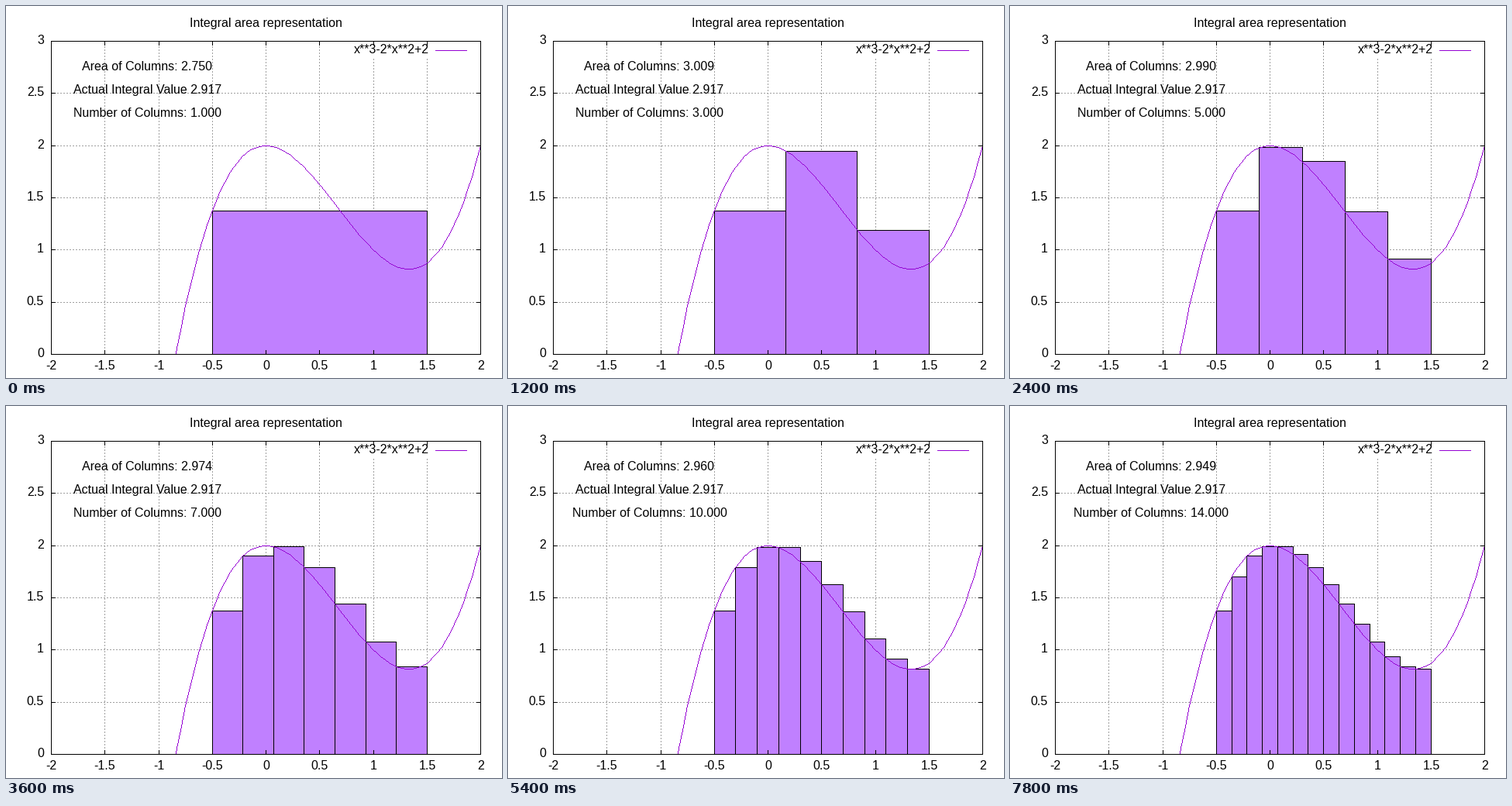
A matplotlib script for the animation above (8 s loop, 640x480 px).

```python
import numpy as np
import matplotlib.pyplot as plt
from matplotlib.animation import FuncAnimation
from matplotlib.collections import PolyCollection

W, H, DPI = 640, 480, 80
PX = 72 / DPI                      # one pixel in points
LEFT, RIGHT, TOP, BOTTOM = 58, 612, 45, 449
KEY_LEFT, KEY_RIGHT, KEY_BOTTOM = 447, 604, 66
TICK = 5
PURPLE, GREY = "#9400d3", "#a0a0a0"
A, B = -0.5, 1.5                   # integration limits
INTERVAL, HOLD, FRAMES = 200, 3, 40

plt.rcParams["font.family"] = "Liberation Sans"
plt.rcParams["font.size"] = 16 * PX


def f(x):
    return x**3 - 2 * x**2 + 2


def nearest(v):
    return np.floor(v + 0.5).astype(int)


def col(x):
    return nearest(LEFT + (x + 2) * (RIGHT - LEFT) / 4)


def row(y):
    return nearest(BOTTOM - y * (BOTTOM - TOP) / 3)


fig = plt.figure(figsize=(W / DPI, H / DPI), dpi=DPI, facecolor="white")
ax = fig.add_axes([0, 0, 1, 1])
ax.set_xlim(0, W)
ax.set_ylim(H, 0)
ax.axis("off")


def line(xs, ys, color="black", **kw):
    """Draw a straight one-pixel line; snapping centres it on the pixels."""
    ax.plot(xs, ys, color=color, lw=PX, antialiased=False, snap=True,
            zorder=5, **kw)


def dots(xs, ys, color, z):
    """Fill single pixels given by column and row."""
    squares = [[(x, y), (x + 1, y), (x + 1, y + 1), (x, y + 1)]
               for x, y in zip(xs, ys)]
    ax.add_collection(PolyCollection(squares, facecolors=color, linewidths=0,
                                     antialiaseds=False, zorder=z),
                      autolim=False)


def trace(xs, ys):
    """Pixels of a polyline through whole-pixel points."""
    points = []
    for x0, y0, x1, y1 in zip(xs[:-1], ys[:-1], xs[1:], ys[1:]):
        n = max(abs(x1 - x0), abs(y1 - y0)) + 1
        points += zip(nearest(np.linspace(x0, x1, n)),
                      nearest(np.linspace(y0, y1, n)))
    return np.array(points)


def label(x, baseline, text, ha="center"):
    return ax.text(x, baseline, text, ha=ha, va="baseline", zorder=6)


def dashed(start, stop):
    """Positions of two-pixel dashes with two-pixel gaps."""
    k = np.arange(abs(stop - start) + 1)
    return start + np.sign(stop - start) * k[k % 4 < 2]


# Grid, ticks and tick labels
for v in np.arange(-2, 2.1, 0.5):
    c = col(v)
    if LEFT < c < RIGHT:
        ys = dashed(BOTTOM, KEY_BOTTOM if KEY_LEFT < c < KEY_RIGHT else TOP)
        dots(np.full_like(ys, c), ys, GREY, 1)
        line([c, c], [BOTTOM, BOTTOM - TICK])
        line([c, c], [TOP, TOP + TICK])
    label(c + 0.5, 469, f"{v:g}")

for v in np.arange(0, 3.1, 0.5):
    r = row(v)
    if TOP < r < BOTTOM:
        xs = dashed(LEFT, RIGHT)
        dots(xs, np.full_like(xs, r), GREY, 1)
        line([LEFT, LEFT + TICK], [r, r])
        line([RIGHT, RIGHT - TICK], [r, r])
    label(49, r + 4, f"{v:g}", ha="right")

line([LEFT, RIGHT, RIGHT, LEFT, LEFT], [BOTTOM, BOTTOM, TOP, TOP, BOTTOM],
     solid_joinstyle="miter", solid_capstyle="projecting")

# Curve
x = np.linspace(-2, 2, 100)
curve = trace(col(x), row(f(x)))
curve = np.unique(curve[curve[:, 1] <= BOTTOM], axis=0)
dots(*curve.T, PURPLE, 4)

# Title, key and readouts
label(335, 27, "Integral area representation")
label(545.5, 61, "x**3-2*x**2+2", ha="right")
line([554, 594], [57, 57], PURPLE, solid_capstyle="projecting")
area_text = label(182.5, 83, "")
label(182.5, 113, "Actual Integral Value 2.917")
count_text = label(182.5, 143, "")

columns = PolyCollection([], facecolors="#c080ff", edgecolors="black",
                         linewidths=PX, antialiaseds=False, snap=True,
                         zorder=3)
ax.add_collection(columns, autolim=False)


def update(frame):
    n = frame // HOLD + 1
    edges = np.linspace(A, B, n + 1)
    heights = f(edges[:-1])
    cols, tops = col(edges), row(heights)
    columns.set_verts([[(l, BOTTOM), (l, t), (r, t), (r, BOTTOM)]
                       for l, r, t in zip(cols[:-1], cols[1:], tops)])
    area_text.set_text(f"Area of Columns: {heights.sum() * (B - A) / n:.3f}")
    count_text.set_text(f"Number of Columns: {n:.3f}")
    return columns, area_text, count_text


anim = FuncAnimation(fig, update, frames=FRAMES, interval=INTERVAL,
                     init_func=lambda: update(0), repeat=True, repeat_delay=0)
plt.show()
```
